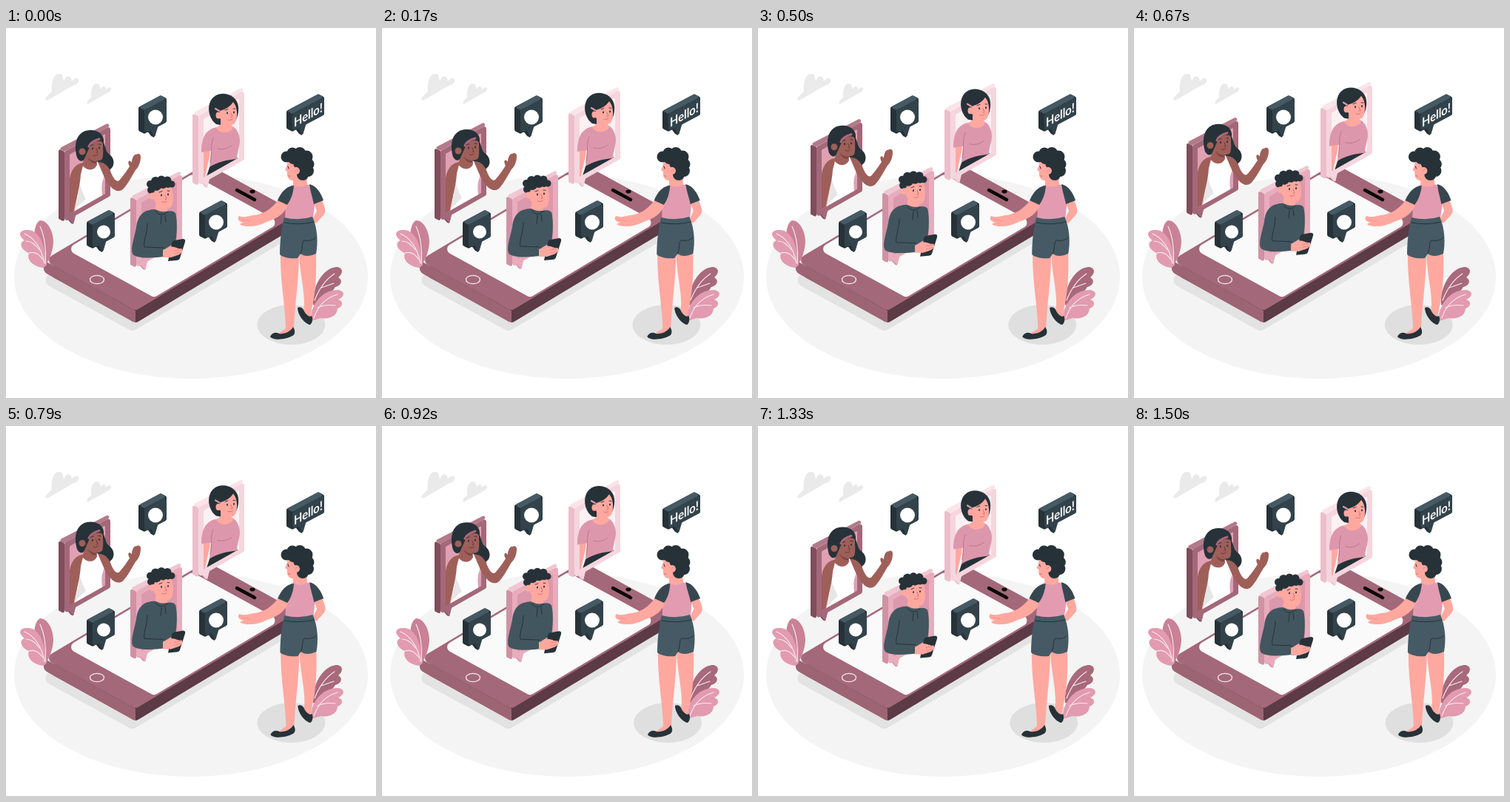
Write an HTML page with a canvas that moves like this. It is 500 by 500 pixels and loops after 1.54 s.

```html
<!DOCTYPE html>
<html lang="en">
<head>
<meta charset="utf-8">
<title>Video chat</title>
<style>
html, body { margin: 0; width: 100%; height: 100%; overflow: hidden; background: #fff; }
canvas { display: block; width: 100vw; height: 100vh; }
</style>
</head>
<body>
<canvas id="stage"></canvas>
<script>
const LOOP = 1540;
const canvas = document.getElementById('stage');
const ctx = canvas.getContext('2d');
const density = Math.max(1, window.devicePixelRatio || 1);
canvas.width = canvas.height = 500 * density;

const DARK = '#263238', SLATE = '#37474f', STEEL = '#455a64', SKIN = '#ffa8a0', BROWN = '#9f5f59';
const PINK = '#e29bb0', ROSE = '#dd97ac', MAUVE = '#a3687a';
const paths = new Map();

function shape(d) {
  if (!paths.has(d)) paths.set(d, new Path2D(d));
  return paths.get(d);
}
function fill(color, d) {
  ctx.fillStyle = color;
  ctx.fill(shape(d));
}
function line(color, width, d) {
  ctx.strokeStyle = color;
  ctx.lineWidth = width;
  ctx.lineCap = ctx.lineJoin = 'round';
  ctx.stroke(shape(d));
}
function oval(color, x, y, rx, ry = rx) {
  ctx.fillStyle = color;
  ctx.beginPath();
  ctx.ellipse(x, y, rx, ry, 0, 0, Math.PI * 2);
  ctx.fill();
}
function poly(color, points, radius = 0) {
  const n = points.length;
  const [a, b] = [points[n - 1], points[0]];
  ctx.fillStyle = color;
  ctx.beginPath();
  ctx.moveTo((a[0] + b[0]) / 2, (a[1] + b[1]) / 2);
  points.forEach((p, i) => ctx.arcTo(...p, ...points[(i + 1) % n], radius));
  ctx.closePath();
  ctx.fill();
}
function group(draw, x = 0, y = 0) {
  ctx.save();
  ctx.translate(x, y);
  draw();
  ctx.restore();
}

// Point on the phone's top face: u along its length, v across, z downwards
const onPhone = (u, v, z = 0) => [51 + 220 * u + 124 * v, 314 - 131 * u + 68 * v + z];
const phoneRect = (u0, u1, v0, v1, z = 0) =>
  [onPhone(u0, v0, z), onPhone(u0, v1, z), onPhone(u1, v1, z), onPhone(u1, v0, z)];

function background() {
  ctx.fillStyle = '#fff';
  ctx.fillRect(0, 0, 500, 500);
  oval('#f4f4f4', 250, 336, 239, 138);
  fill('#eaeaea', 'M54 98C52 94 58 90 62 86C61 76 63 61 72 62C77 62 77 67 78 72C82 62 88 64 89 72C94 66 99 67 98 72C97 75 94 76 90 78L57 97Z');
  fill('#eaeaea', 'M110 103C108 99 112 96 115 94C114 84 117 75 123 75C127 76 127 79 128 82C131 77 135 78 135 83C139 79 143 80 142 83C141 86 138 87 135 89Z');
}

function phone() {
  poly('#e3e3e3', phoneRect(-0.03, 1, 0, 1.02, 23), 9);
  poly('#5c3a46', phoneRect(0, 1, 0, 1, 16), 9);
  fill('#9d6474', 'M51 314L175 382L175 398Q172 398 168 395L55 332Q50 329 51 321Z');
  fill('#5c3a46', 'M175 382L394 251L394 267L180 396Q177 398 175 398Z');
  poly(MAUVE, phoneRect(0, 1, 0, 1), 7);
  poly('#fafafa', phoneRect(0.125, 0.9, 0.02, 0.98), 7);
  ctx.strokeStyle = '#f7e8ec';
  ctx.lineWidth = 1.3;
  ctx.beginPath();
  ctx.ellipse(123, 340, 9.5, 5.7, 0, 0, Math.PI * 2);
  ctx.stroke();
  line('#080808', 4.5, 'M312 219L336 232');
  oval('#080808', 333, 221, 3.6, 2.4);
}

function plants() {
  fill('#c98196', 'M51 320C37 300 34 266 46 260C57 260 64 276 64 290C63 304 58 314 54 320Z');
  fill(PINK, 'M51 324C38 323 27 314 31 304C20 300 17 289 25 287C16 280 17 272 31 273C45 274 53 293 55 320Z');
  line('#fbe9ee', 1.1, 'M53 318C55 300 52 281 46 268M52 318C48 298 39 284 25 278M50 313C44 304 38 302 31 304M45 300C39 291 33 288 27 288');
  fill('#a8697c', 'M415 374C413 352 427 325 446 323C455 323 457 331 449 337C456 341 453 348 445 350C439 360 428 363 419 375Z');
  fill(PINK, 'M412 396C411 374 427 354 448 354C459 355 458 363 449 367C456 369 456 376 448 379C448 388 438 394 425 392Z');
  line('#fbe9ee', 1.1, 'M417 368C424 350 433 339 444 332M426 351L443 345M416 392C422 374 434 364 448 360M421 378C429 374 438 374 445 375');
}

function bubble(x, y, w, h) {
  const rise = w * 0.53;
  poly(DARK, [[x - 8, y - 4], [x + w - 8, y - rise - 4], [x + w, y - rise], [x + w, y + h - rise], [x, y + h], [x - 8, y + h - 4]], 3);
  poly(STEEL, [[x - 8, y - 4], [x + w - 8, y - rise - 4], [x + w, y - rise], [x, y]], 2);
  poly(DARK, [[x + 3, y + h - 5], [x + 19, y + h - 13], [x + 13, y + h + 5], [x + 9, y + h + 3]], 1);
  poly('#33434b', [[x, y], [x + w, y - rise], [x + w, y + h - rise], [x, y + h]], 3);
  poly('#33434b', [[x + 8, y + h - 6], [x + 19, y + h - 12], [x + 14, y + h + 5]], 1);
}

function bubbles() {
  for (const [x, y, r] of [[187, 111, 10], [117, 266, 9], [269, 253, 10]]) {
    bubble(x, y, 30, 32);
    oval('#fff', x + 15, y + 9.5, r);
  }
  bubble(387, 116, 43, 24);
  ctx.save();
  ctx.transform(0.866, -0.48, 0, 1, 408.5, 123.5);
  ctx.fillStyle = '#fff';
  ctx.font = 'bold 17px Lato, sans-serif';
  ctx.textAlign = 'center';
  ctx.fillText('Hello!', 0, 0);
  ctx.restore();
}

function panel(x, y, h, [front, side, top, back]) {
  const w = 62, rise = 35;
  poly(side, [[x + 3, y + h - 5], [x + 16, y + h - 13], [x + 12, y + h + 3], [x + 9, y + h + 2]], 1);
  poly(side, [[x - 8, y - 4], [x, y], [x, y + h], [x - 8, y + h - 4]], 2);
  poly(top, [[x - 8, y - 4], [x + w - 4, y - rise - 3], [x + w, y - rise], [x, y]], 2);
  poly(front, [[x, y], [x + w, y - rise], [x + w, y + h - rise], [x, y + h]], 3);
  poly(front, [[x + 4, y + h - 6], [x + 16, y + h - 13], [x + 12, y + h + 3]], 1);
  poly(back, [[x + 7, y + 4], [x + w - 7, y - 24], [x + w - 7, y + h - 38], [x + 7, y + h - 11]], 1);
}
function insidePanel(x, y, h, draw) {
  ctx.save();
  ctx.beginPath();
  [[x + 7, 0], [x + 55, 0], [x + 55, y + h - 38], [x + 7, y + h - 11]].forEach(p => ctx.lineTo(...p));
  ctx.clip();
  draw();
  ctx.restore();
}
function features(x, y, color, blush) {
  oval(color, x - 4, y, 1, 1.4);
  oval(color, x + 5, y - 1, 1, 1.4);
  line(color, 0.9, `M${x - 7} ${y - 4}l4 -1.4M${x + 4} ${y - 6}l3 .3`);
  line(blush, 1, `M${x + 1} ${y}l2 5l-2 .5M${x - 3} ${y + 9}q4 1.5 6 -1`);
}

function wavingWoman() {
  panel(79, 167, 95, [MAUVE, '#7f4e5d', '#b27a8a', '#dfa0b3']);
  insidePanel(79, 167, 95, () => {
    fill('#fff', 'M104 184L123 180C131 183 133 190 132 203C128 212 129 222 132 236L90 258C99 228 96 205 103 186Z');
    fill('#e6e6e6', 'M99 210C103 220 105 226 108 231L94 244Z');
    fill(BROWN, 'M105 182C92 183 86 195 85 212L84 255L91 251C94 232 100 216 101 198Z');
  });
  fill(DARK, 'M116 148C139 148 130 164 140 171C150 179 145 193 136 192C127 189 127 176 112 178Z');
  fill(BROWN, 'M124 181C136 181 140 190 143 198C147 206 150 208 153 206C159 199 164 192 167 187C163 180 167 177 170 182C170 176 173 170 176 171C179 169 182 170 182 174C182 182 179 188 175 192C169 202 164 212 158 218C152 222 148 220 143 216C137 210 133 202 130 195Z');
  fill(BROWN, 'M108 168L122 174L123 185C119 194 108 193 103 185Z');
  fill('#7e4744', 'M110 174Q116 181 123 180L122 183Q114 184 110 174Z');
  fill(BROWN, 'M104 156C114 147 128 149 131 156C131 164 132 172 130 177C126 182 114 179 107 172Z');
  fill(DARK, 'M96 175C90 153 98 138 114 138C127 138 133 146 132 155C125 150 115 154 112 163L107 174C105 182 99 181 96 175Z');
  line('#ad667d', 3, 'M112 160C114 155 119 152 126 150');
  oval(BROWN, 103, 167, 4.5);
  features(121, 163, DARK, '#6d3638');
}

function phoneMan() {
  panel(176, 232, 92, ['#e8acbd', '#cf92a4', '#f0c6d2', '#dc98ac']);
  fill(SKIN, 'M203 230L218 240L218 252L201 250Z');
  fill('#42565f', 'M201 245C186 246 178 252 176 270C173 285 168 298 171 305C174 312 200 311 213 309L216 298L229 290C232 275 231 256 229 250C222 243 215 252 204 246Z');
  line(DARK, 1, 'M191 264C191 277 185 290 187 296L213 297M202 248Q210 257 219 248M210 254L209 265M215 253L216 262');
  fill(DARK, 'M224 291Q225 287 228 287L239 285Q243 285 242 289L235 311Q234 314 230 314L219 315Z');
  fill(SKIN, 'M212 300L221 296C228 294 231 299 237 298C241 301 237 305 232 307L223 310L212 310Z');
  line('#e78380', 0.8, 'M227 301L236 299M227 305L236 303');
  fill(SKIN, 'M199 217L223 214C227 225 227 238 222 243C214 246 206 241 200 233Z');
  const curls = [[195, 211, 5], [196, 219, 5], [202, 207, 6], [210, 205, 5.5], [218, 206, 5.5], [224, 211, 4.5], [203, 213, 7], [212, 210, 7], [219, 211, 5]];
  curls.forEach(c => oval(DARK, ...c));
  oval(SKIN, 198, 227, 4.5);
  features(214, 226, DARK, '#dc6d70');
}

function bobWoman() {
  panel(260, 119, 94, ['#f5d5de', '#ebbfcc', '#fae4ea', '#fcf0f3']);
  insidePanel(260, 119, 94, () => {
    fill(SKIN, 'M266 164L276 164C275 180 270 190 269 204L262 204Z');
    fill(DARK, 'M277 182L311 174L317 180L314 185L268 210Z');
  });
  fill(ROSE, 'M286 134L306 133C312 135 316 145 316 152C316 160 312 168 312 177C299 178 286 181 275 188L277 166L264 168C264 150 269 136 286 134Z');
  line('#bd7188', 0.9, 'M280 148C276 157 279 168 276 182M286 163Q296 166 305 159');
  fill(DARK, 'M284 130C273 122 270 102 281 93C292 84 312 90 314 106C315 116 312 123 308 129L290 131Z');
  fill(SKIN, 'M290 122L303 129L307 134C304 143 289 144 284 135L290 131Z');
  fill(SKIN, 'M289 112C297 110 304 105 307 100C313 106 314 122 309 129C303 134 294 130 289 122Z');
  line(ROSE, 2.2, 'M283 109L288 112');
  oval(SKIN, 287, 118, 3.5, 4.5);
  features(303, 115, DARK, '#dc6d70');
}

// Sideways sway of the standing woman: [time, offset]
const swayKeys = [[0, 0], [290, 2], [670, -1], [920, 2], [1080, -1], [1330, -1], [LOOP, 0]];
function sway(t) {
  const i = swayKeys.findIndex(k => t < k[0]);
  const [t0, a] = swayKeys[i - 1], [t1, b] = swayKeys[i];
  return a + (b - a) * (1 - Math.cos(Math.PI * (t - t0) / (t1 - t0))) / 2;
}

function legs() {
  fill(SKIN, 'M396 303L419 302C420 335 418 360 413 380L411 391L402 385C406 362 397 335 396 303Z');
  fill(SKIN, 'M371 304L396 304C396 340 390 375 389 406C384 412 372 415 365 415L378 406C378 380 370 340 371 304Z');
  fill(DARK, 'M357 417C360 411 365 411 369 413C375 414 384 411 388 404C392 410 390 415 387 416C378 421 361 423 357 417Z');
  fill(DARK, 'M394 378C398 376 402 379 403 383C406 388 410 391 413 389C415 393 414 399 411 401C404 400 394 388 394 378Z');
}
function shorts() {
  fill(STEEL, 'M376 256Q396 261 414 255C421 270 422 290 419 305C410 309 403 309 398 305L394 311C384 312 374 310 370 306C370 290 372 270 376 256Z');
  line(DARK, 1, 'M376 263Q396 267 416 262M398 305C402 296 399 289 403 287C410 288 415 287 419 283');
}
function torso() {
  fill(SKIN, 'M416 237L427 233C433 246 432 250 428 254L419 264L414 259L420 247Z');
  fill(PINK, 'M385 213C392 210 404 210 413 213C420 222 417 240 415 258C402 261 388 260 377 257C378 240 378 225 385 213Z');
  fill(SLATE, 'M410 211C420 213 426 224 429 233L416 238C414 228 411 220 410 211Z');
  fill(SKIN, 'M368 232L382 237C378 250 366 258 352 262C342 268 325 270 317 266C315 264 319 263 322 263C313 262 312 257 315 254C322 257 327 254 334 253C346 252 358 246 368 232Z');
  fill(SLATE, 'M389 213C379 213 371 223 367 233L380 239C385 232 388 224 389 213Z');
  line('#ef8c88', 0.8, 'M318 259L329 261');
}
function head() {
  fill(SKIN, 'M388 198L406 198L407 211C402 216 391 215 388 212Z');
  fill(SKIN, 'M381 177C380 187 378 190 377 192L380 194C379 202 383 207 390 206L402 202L402 178Z');
  const curls = [[379, 174, 7.5], [387, 169, 7.5], [397, 169, 8], [406, 174, 8.5], [409, 184, 7.5], [408, 193, 8], [401, 198, 8], [401, 181, 13], [388, 177, 7]];
  curls.forEach(c => oval(DARK, ...c));
  oval(SKIN, 392, 193, 5);
  line('#e98784', 0.9, 'M391 194Q391 191 394 191');
  line(DARK, 1, 'M381 187L382 190');
  line('#dc6d70', 1, 'M381 200L384 200');
}

function standingWoman(t) {
  const dx = sway(t);
  group(legs, dx);
  ctx.save();
  // lean about the neck so that the hips carry the full offset
  ctx.transform(1, 0, dx / 60, 1, -dx / 60 * 200, 0);
  torso();
  ctx.restore();
  group(shorts, dx);
  group(head, Math.min(0, dx * 0.6));
}

function draw(t) {
  const phase = Math.PI * 2 * t / LOOP;
  const lift = -4.3 * (1 - Math.cos(phase));
  ctx.setTransform(density, 0, 0, density, 0, 0);
  background();
  phone();
  oval('#dfdfdf', 385.3 - 1.3 * Math.sin(phase), 401, 46, 27);
  plants();
  group(bobWoman, 0, lift);
  group(wavingWoman, 0, lift);
  group(phoneMan, 0, lift);
  bubbles();
  standingWoman(t);
}

const start = performance.now();
function tick() {
  draw((performance.now() - start) % LOOP);
  requestAnimationFrame(tick);
}
tick();
</script>
</body>
</html>
```
